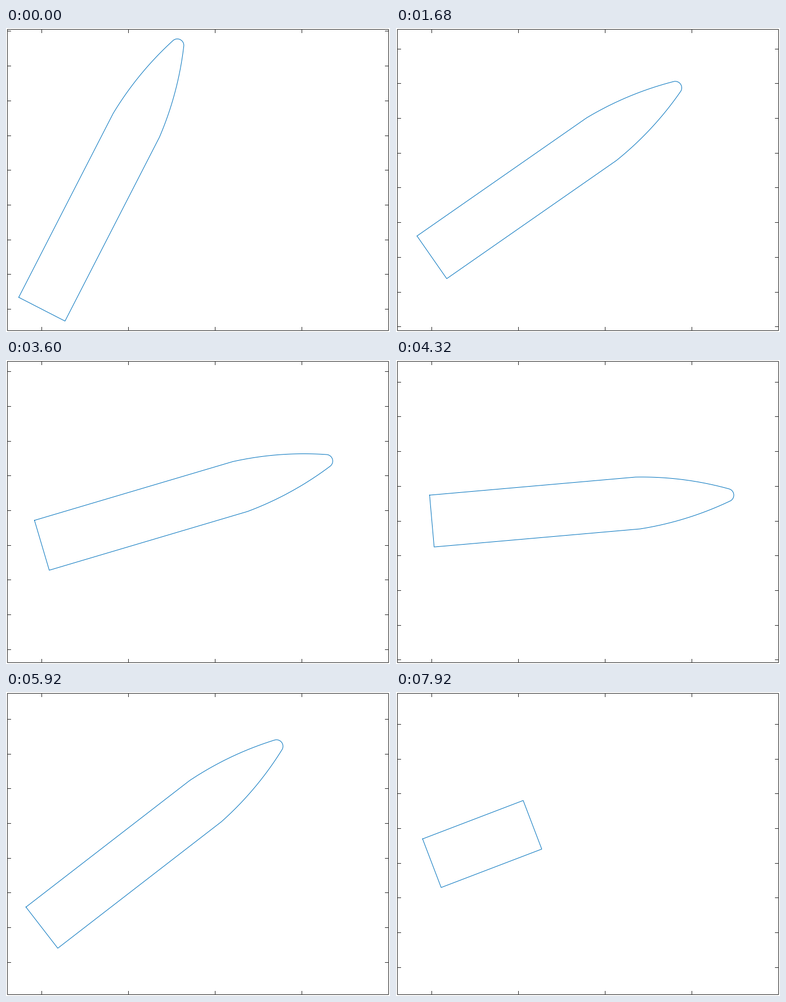
Recreate the animation shown at these times as a matplotlib script. Size 682 by 540 pixels, loop 8000 ms.

```python
import numpy as np
import matplotlib.pyplot as plt
from matplotlib.animation import FuncAnimation
from matplotlib.collections import LineCollection

W, H, DPI = 682, 540, 100
PX = 72 / DPI                      # one pixel in points
LEFT, TOP, RIGHT, BOTTOM = 2.5, 2.5, 679.5, 537.5
X0, MID_Y = 63.7, 270              # screen x of the base, vertical centre
SCALE = 30.8                       # pixels per unit
TICK, Y_STEP = 6.5, 61.7

INK, BLUE = "#262626", "#0072BD"

FRAMES, STEP_MS = 100, 80
FLIGHT, HOLD = 58, 2               # frames per flight, extra frames on the pad
BURNOUT, SEPARATION = 22, 25


def arc(p, q, bend, n=40):
    """Circular arc from p to q whose end tangents leave the chord by `bend`."""
    p, q = np.array(p), np.array(q)
    chord = q - p
    normal = np.array([-chord[1], chord[0]])
    a = np.linspace(-bend, bend, n)[:, None]
    along = (np.sin(a) / np.sin(bend) + 1) / 2
    rise = (np.cos(a) - np.cos(bend)) / (2 * np.sin(bend))
    return p + along * chord + rise * normal


def full_rocket():
    half, body, tip, r = 1.5, 11.92, 17.1, 0.376
    sweep = np.radians(65)
    a = np.linspace(sweep, -sweep, 30)
    cap = np.column_stack([tip + r * np.cos(a), r * np.sin(a)])
    side = arc((body, half), cap[0], np.radians(8.3))
    return np.vstack([(0, half), side, cap, side[::-1] * (1, -1),
                      (0, -half), (0, half)])


def lower_stage():
    return np.array([(0, 1.5), (6.21, 1.5), (6.21, -1.5), (0, -1.5), (0, 1.5)])


def pitch(n):
    """Gravity turn: logarithmic under thrust, then a coasting fall-off."""
    t = min(n, BURNOUT)
    m = max(n - BURNOUT, 0)
    u = 1.42 - 0.2083 * np.log(1 + t / 0.483)
    u -= m * (0.00882 + 0.000384 * m - 2.88e-6 * m * m)
    return np.arctan(np.sinh(u))


def place(shape, angle):
    """Rotate a shape and centre it vertically; also give the base height."""
    c, s = np.cos(angle), np.sin(angle)
    x = X0 + SCALE * (shape[:, 0] * c - shape[:, 1] * s)
    y = -SCALE * (shape[:, 0] * s + shape[:, 1] * c)
    base = MID_Y - (y.min() + y.max()) / 2
    return x, y + base, base


def pixel(v):
    """Centre of the pixel that holds v."""
    return np.floor(v) + 0.5


def y_ticks(base):
    segs = []
    for k in range(-9, 5):
        y = pixel(base + k * Y_STEP)
        if TOP < y < BOTTOM:
            segs += [[(LEFT, y), (LEFT + TICK, y)],
                     [(RIGHT - TICK, y), (RIGHT, y)]]
    return segs


def x_ticks():
    segs = []
    for k in range(4):
        x = pixel(X0 + 5 * k * SCALE)
        segs += [[(x, TOP), (x, TOP + TICK)], [(x, BOTTOM - TICK), (x, BOTTOM)]]
    return segs


ROCKET, STAGE = full_rocket(), lower_stage()

fig = plt.figure(figsize=(W / DPI, H / DPI), dpi=DPI, facecolor="white")
ax = fig.add_axes([0, 0, 1, 1])
ax.set_xlim(0, W)
ax.set_ylim(H, 0)
ax.axis("off")

box = [(LEFT, TOP), (RIGHT, TOP), (RIGHT, BOTTOM), (LEFT, BOTTOM), (LEFT, TOP)]


def ink_lines(segs):
    # coordinates already sit on pixel centres, so snapping stays off
    lines = LineCollection(segs, colors=INK, linewidths=PX, snap=False,
                           capstyle="butt", joinstyle="miter")
    return ax.add_collection(lines, autolim=False)


ink_lines([box] + x_ticks())
ticks = ink_lines([])
outline, = ax.plot([], [], color=BLUE, lw=PX, solid_joinstyle="round",
                   snap=False)


def draw(i):
    flight, j = divmod(i, FLIGHT)
    n = max(j - HOLD, 0)
    shape = STAGE if flight == 1 and n >= SEPARATION else ROCKET
    x, y, base = place(shape, pitch(n))
    outline.set_data(x, y)
    ticks.set_segments(y_ticks(base))
    return outline, ticks


anim = FuncAnimation(fig, draw, frames=FRAMES, init_func=lambda: draw(0),
                     interval=STEP_MS, repeat=True, repeat_delay=0)
plt.show()
```
